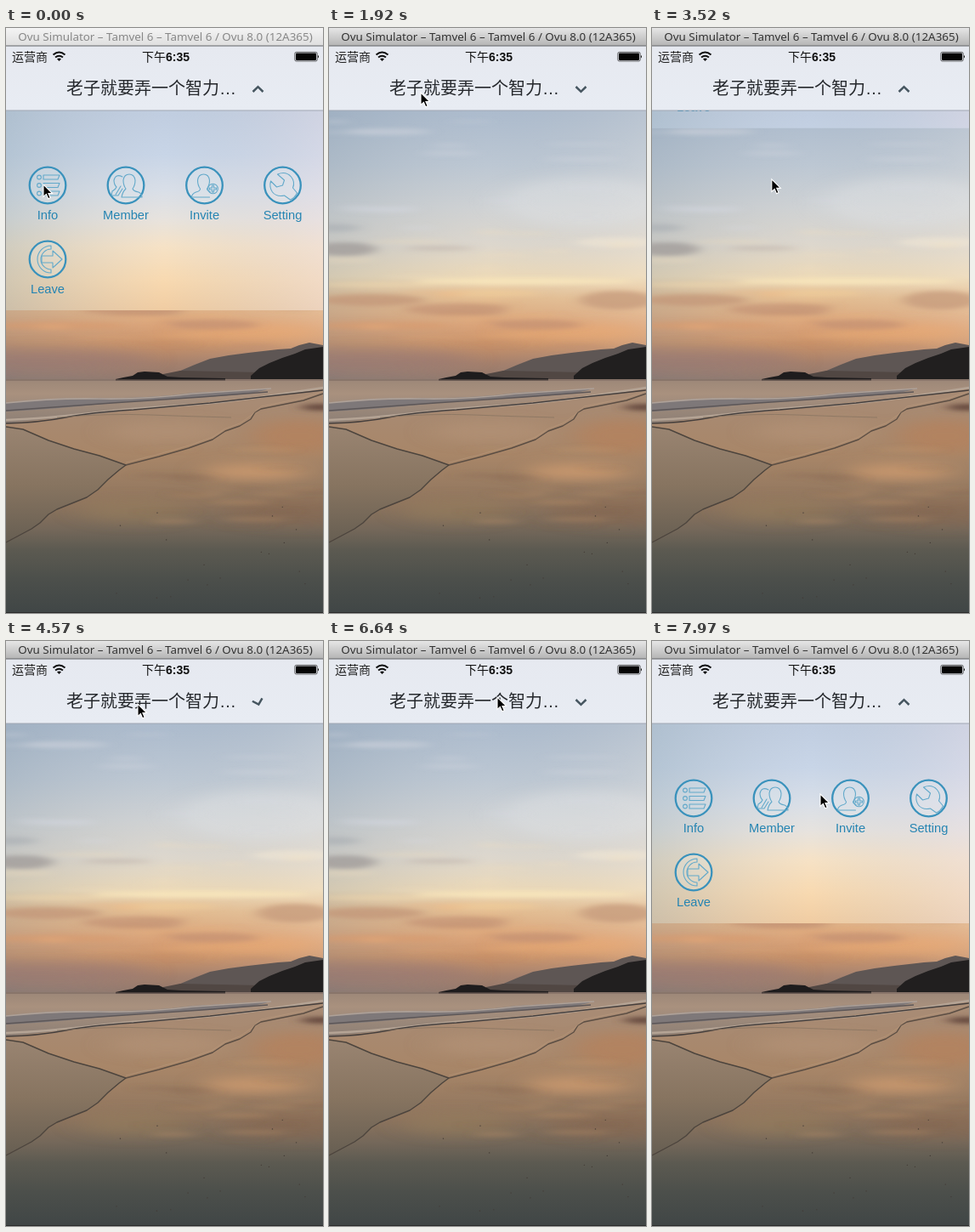
Write an HTML page that moves like this. It is 373 px wide and 688 px high and loops after 8000 ms.

```html
<!DOCTYPE html>
<html lang="zh">
<head>
<meta charset="utf-8">
<title>Navigation menu</title>
<style>
html, body { margin: 0; width: 100%; height: 100%; overflow: hidden; background: #4a4b48; }
svg { display: block; width: 373px; height: 688px; }
.cjk { font-family: "Noto Sans CJK SC", "Noto Sans CJK", sans-serif; }
.label { font: 14.7px "Liberation Sans", sans-serif; fill: #2584b2; text-anchor: middle; }
.glyph { fill: none; stroke: #63a9ca; stroke-width: 1.1; stroke-linejoin: round; stroke-linecap: round; }
</style>
</head>
<body>
<svg viewBox="0 0 373 688" xmlns="http://www.w3.org/2000/svg">
  <defs>
    <linearGradient id="sky" gradientUnits="userSpaceOnUse" x1="0" y1="97" x2="0" y2="413">
      <stop offset="0" stop-color="#acbbcd"/>
      <stop offset=".2" stop-color="#bcc7d3"/>
      <stop offset=".36" stop-color="#cfd2d4"/>
      <stop offset=".5" stop-color="#ddd7cd"/>
      <stop offset=".62" stop-color="#ecd9b8"/>
      <stop offset=".7" stop-color="#e4bd91"/>
      <stop offset=".8" stop-color="#dba479"/>
      <stop offset=".87" stop-color="#c99269"/>
      <stop offset=".94" stop-color="#a5806c"/>
      <stop offset="1" stop-color="#92786c"/>
    </linearGradient>
    <linearGradient id="side">
      <stop offset="0" stop-color="#6f8698" stop-opacity=".2"/>
      <stop offset=".5" stop-color="#a0a8b0" stop-opacity="0"/>
      <stop offset="1" stop-color="#fff4e8" stop-opacity=".16"/>
    </linearGradient>
    <linearGradient id="sea" gradientUnits="userSpaceOnUse" x1="0" y1="413" x2="0" y2="470">
      <stop offset="0" stop-color="#9c8778"/>
      <stop offset=".3" stop-color="#a9917e"/>
      <stop offset="1" stop-color="#887c74"/>
    </linearGradient>
    <linearGradient id="sand" gradientUnits="userSpaceOnUse" x1="0" y1="440" x2="0" y2="688">
      <stop offset="0" stop-color="#a88b74"/>
      <stop offset=".25" stop-color="#a88668"/>
      <stop offset=".48" stop-color="#8f755e"/>
      <stop offset=".6" stop-color="#75685a"/>
      <stop offset=".7" stop-color="#5c5a51"/>
      <stop offset=".84" stop-color="#4c4f4b"/>
      <stop offset="1" stop-color="#404646"/>
    </linearGradient>
    <linearGradient id="film" gradientUnits="userSpaceOnUse" x1="0" y1="470" x2="0" y2="606">
      <stop offset="0" stop-color="#998471"/>
      <stop offset=".5" stop-color="#877460"/>
      <stop offset="1" stop-color="#665e52"/>
    </linearGradient>
    <linearGradient id="frost" gradientUnits="userSpaceOnUse" x1="0" y1="97" x2="0" y2="332">
      <stop offset="0" stop-color="#c0cde0"/>
      <stop offset=".22" stop-color="#c8d5e7"/>
      <stop offset=".4" stop-color="#d9dfe8"/>
      <stop offset=".54" stop-color="#e7e3de"/>
      <stop offset=".68" stop-color="#f6e2c6"/>
      <stop offset=".85" stop-color="#f8d9b0"/>
      <stop offset="1" stop-color="#f0cca2"/>
    </linearGradient>
    <linearGradient id="frostSide">
      <stop offset="0" stop-color="#93a9b4" stop-opacity=".38"/>
      <stop offset=".5" stop-color="#b5bfc8" stop-opacity="0"/>
      <stop offset="1" stop-color="#e8dde6" stop-opacity=".4"/>
    </linearGradient>
    <linearGradient id="bar" x1="0" y1="0" x2="0" y2="1">
      <stop offset="0" stop-color="#e6e9f0"/>
      <stop offset="1" stop-color="#e8ecf3"/>
    </linearGradient>
    <linearGradient id="active" x1="0" y1="0" x2="0" y2="1">
      <stop offset="0" stop-color="#e6e6e6"/>
      <stop offset="1" stop-color="#b4b4b4"/>
    </linearGradient>
    <linearGradient id="idle" x1="0" y1="0" x2="0" y2="1">
      <stop offset="0" stop-color="#f4f4f4"/>
      <stop offset="1" stop-color="#dedede"/>
    </linearGradient>
    <filter id="soft" x="-30%" y="-100%" width="160%" height="300%"><feGaussianBlur stdDeviation="8 2.6"/></filter>
    <filter id="haze" x="-50%" y="-100%" width="200%" height="300%"><feGaussianBlur stdDeviation="16 7"/></filter>
    <clipPath id="body"><rect y="97" width="373" height="591"/></clipPath>
    <clipPath id="sheetClip"><rect id="sheetBox" y="97" width="373" height="235"/></clipPath>
  </defs>

  <g clip-path="url(#body)">
    <rect y="97" width="373" height="317" fill="url(#sky)"/>
    <rect y="97" width="373" height="317" fill="url(#side)"/>
    <g filter="url(#haze)">
      <ellipse cx="300" cy="205" rx="100" ry="30" fill="#e0e2e5" opacity=".45"/>
      <ellipse cx="290" cy="358" rx="85" ry="10" fill="#eeaa72" opacity=".6"/>
      <ellipse cx="40" cy="390" rx="130" ry="13" fill="#977670" opacity=".5"/>
    </g>
    <g id="clouds" filter="url(#soft)"></g>
    <path d="M203 404L222 396L240 389L262 385L285 382L320 378L335 377L345 373L357 370L373 373V413H203Z" fill="#5e5654"/>
    <path d="M185 407L205 403L300 405V413H185Z" fill="#514743"/>
    <path d="M288 409L298 400L310 394L325 388L340 383L352 378L373 375V413H288Z" fill="#211f1f"/>
    <rect y="413" width="373" height="60" fill="url(#sea)"/>
    <path d="M129 413L138 411L149 409L155 405L163 404L180 405L190 410L206 411L258 412V414.500H129Z" fill="#1e1c1d"/>
    <path d="M0 414H373" stroke="#76655d" stroke-width="1.2"/>
    <path d="M0 465Q90 456 150 449T373 424V688H0Z" fill="url(#sand)"/>
    <g filter="url(#haze)">
      <ellipse cx="292" cy="522" rx="62" ry="9" fill="#d9a273" opacity=".7"/>
      <ellipse cx="345" cy="480" rx="55" ry="20" fill="#b98059" opacity=".6"/>
      <ellipse cx="190" cy="475" rx="70" ry="13" fill="#b8957a" opacity=".5"/>
      <ellipse cx="340" cy="570" rx="80" ry="16" fill="#87664e" opacity=".5"/>
      <ellipse cx="150" cy="568" rx="65" ry="14" fill="#98805f" opacity=".5"/>
    </g>
    <g id="glints" filter="url(#soft)"></g>
    <ellipse cx="371" cy="446" rx="24" ry="4" fill="#674b40" filter="url(#soft)"/>
    <path d="M0 441Q50 434 110 435T220 429L310 424Q295 431 230 434T105 443T0 451Z" fill="#7e7879"/>
    <path d="M0 441Q55 435 110 436T220 430L312 424" fill="none" stroke="#aea198" stroke-width="1.6"/>
    <path d="M0 450Q80 444 125 441T230 434L308 428" fill="none" stroke="#5d5758" stroke-width="1.6"/>
    <path d="M0 461Q50 459 100 453T205 444T373 423" fill="none" stroke="#b5a495" stroke-width="2.4"/>
    <path d="M0 465Q40 464 70 458T150 449L240 441L310 433L373 426" fill="none" stroke="#453f3d" stroke-width="1.7"/>
    <path d="M0 469L20 472L50 485L80 495L110 503L141 514L133 520L120 531L108 543L95 552L75 560L60 566L50 572L40 582L30 589L15 597L0 605Z" fill="url(#film)"/>
    <path d="M0 469L20 472L50 485L80 495L110 503L141 514L133 520L120 531L108 543L95 552L75 560L60 566L50 572L40 582L30 589L15 597L0 605" fill="none" stroke="#4c443d" stroke-width="1.4" stroke-linejoin="round"/>
    <path d="M141 514L180 504L215 494L243 484L258 474L275 468L288 460L293 452L300 448L330 442L350 438L373 430" fill="none" stroke="#5a4d43" stroke-width="1.4" stroke-linejoin="round"/>
    <path d="M141 511L180 501L215 491L243 481L258 471L275 465L288 456L300 445L350 435L373 427" fill="none" stroke="#bd9d80" opacity=".5"/>
    <path d="M60 458Q120 453 170 455T265 458" fill="none" stroke="#857260" opacity=".7"/>
    <g id="pebbles" fill="#413a34"></g>
    <path d="M0 687.500H373" stroke="#2b2b2b"/>
  </g>

  <g clip-path="url(#sheetClip)">
    <rect y="97" width="373" height="235" fill="url(#frost)"/>
    <rect y="97" width="373" height="235" fill="url(#frostSide)"/>
    <g id="items"></g>
  </g>

  <rect y="21" width="373" height="76" fill="url(#bar)"/>
  <path d="M0 97H373" stroke="#a2a8b3" stroke-width="1.2"/>
  <text class="cjk" x="7" y="39" font-size="14" fill="#222">运营商</text>
  <g fill="none" stroke="#111" stroke-width="2">
    <path d="M55.500 31.500Q62.500 25.500 69.500 31.500M58 34.500Q62.500 31 67 34.500"/>
    <path d="M60 36.500Q62.500 34.500 65 36.500L62.500 39Z" fill="#111" stroke="none"/>
  </g>
  <text class="cjk" x="160" y="39" font-size="14" font-weight="500" fill="#111">下午<tspan font-family="Liberation Sans, sans-serif" font-weight="700">6:35</tspan></text>
  <rect x="339.800" y="28.400" width="26.400" height="10.600" rx="1.800" fill="none" stroke="#222" stroke-width=".7"/>
  <rect x="341" y="29.500" width="24" height="8.400" rx=".8" fill="#050505"/>
  <path d="M367 32Q369 33.700 367 35.500Z" fill="#050505"/>
  <text class="cjk" x="71" y="78" font-size="20" font-weight="350" fill="#25282c">老子就要弄一个智力<tspan font-family="Liberation Sans, sans-serif">…</tspan></text>
  <path id="chevron" d="M290.500 75L296.500 69.200L302.500 75" fill="none" stroke="#465660" stroke-width="2.500"/>

  <rect id="titleBar" width="373" height="21"/>
  <path d="M0 21H373" stroke="#636569" stroke-width="1.200"/>
  <text id="title" x="187.500" y="15" font-family="Noto Sans, sans-serif" font-size="13.400" text-anchor="middle">Ovu Simulator – Tamvel 6 – Tamvel 6 / Ovu 8.0 (12A365)</text>

  <path id="cursor" d="M0 0V14.500L3.400 11.400L5.700 16.800L8.200 15.700L5.900 10.500H10.500Z" fill="#000" stroke="#fff" stroke-width="1.100"/>
</svg>
<script>
const $ = id => document.getElementById(id);
const LOOP = 8000, STEP = 147.6, TRAVEL = 235, SLIDE = 400;

let seed = 11;
const rand = (a, b) => {
  seed = (seed * 16807) % 2147483647;
  return a + (b - a) * seed / 2147483647;
};
const blob = (x, y, rx, ry, color, o) =>
  `<ellipse cx="${x}" cy="${y}" rx="${rx}" ry="${ry}" fill="${color}" opacity="${o}"/>`;

function drawClouds() {
  let s = blob(18, 260, 38, 8, '#9c9896', .7) + blob(130, 259, 40, 3, '#bdb2a8', .5)
    + blob(8, 235, 28, 5, '#a9adb2', .6) + blob(230, 298, 130, 4, '#fbe9bd', .8)
    + blob(60, 302, 70, 3, '#f3dcb0', .5) + blob(340, 252, 50, 6, '#f1e7d4', .6)
    + blob(50, 320, 62, 7, '#c29578', .7) + blob(150, 331, 60, 7, '#c39375', .7)
    + blob(340, 320, 45, 11, '#c59a7b', .75) + blob(245, 349, 52, 6, '#c08f72', .65)
    + blob(60, 350, 80, 5, '#d99a6d', .5) + blob(190, 312, 60, 4, '#f0cb98', .6)
    + blob(70, 122, 50, 4, '#cbd1da', .6);
  for (let i = 0; i < 40; i++) {
    const y = rand(110, 375);
    const color = y < 240 ? '#d6dae0' : y < 305 ? '#f2dfbd' : i % 2 ? '#eeb17c' : '#b98a70';
    s += blob(rand(0, 373), y, rand(15, 48), rand(1, 3), color, .34);
  }
  $('clouds').innerHTML = s;
}

function drawBeach() {
  let glints = '', pebbles = '';
  for (let i = 0; i < 18; i++) {
    glints += blob(rand(190, 373), rand(495, 590), rand(15, 45), rand(1, 3), i % 2 ? '#c99a70' : '#7d634e', .28);
    pebbles += blob(rand(90, 370), rand(560, 680), .7, .6, '#413a34', 1);
  }
  $('glints').innerHTML = glints;
  $('pebbles').innerHTML = pebbles;
}

// Glyphs are drawn around the centre of each ring.
const person = 'M-4 4Q-7 0-7-6Q-6-13 0-13T7-6Q7 0 4 4';
const infoRow = y => `<circle cx="-10" cy="${y}" r="2.400"/><path d="M-5 ${y - 2.5}H14L12 ${y + 2.5}H-5Z"/>`;
const glyphs = {
  Info: [-9.5, 0, 9.5].map(infoRow).join(''),
  Member: `<path d="${person}Q5 7 11 8Q15 10 15 14H-9Q-8 8-4 4" transform="translate(4 0)"/>
    <path d="M-4-10Q-12-14-14-6Q-14-1-11 2Q-12 5-16 7L-17 12H-9L-4 4"/><path d="M-12 11L-6 1"/>`,
  Invite: `<path d="${person}Q4 6 8 8M-4 4Q-4 7-9 8Q-14 10-14 14H7" transform="translate(-1 0)"/>
    <circle cx="10" cy="4" r="5.800"/><path d="M9 0H11V3H14V5H11V8H9V5H6V3H9Z"/>`,
  Setting: '<path d="M-6-13Q4-17 10-10Q15-4 12 3L17 9Q14 15 9 17L2 12Q-7 14-12 8Q-16 2-14-5L-7 2L0 0L2-6Z"/>',
  Leave: `<path d="M4-16A16 16 0 1 0 4 16V12A12 12 0 1 1 4-12Z"/>
    <path d="M-7-4H6V-10L17 0L6 10V4H-7Z"/>`
};

function drawItems() {
  const xs = [49, 141, 233.5, 325.5];
  $('items').innerHTML = Object.keys(glyphs).map((name, i) =>
    `<g transform="translate(${xs[i % 4]} ${i < 4 ? 185 : 272})">
      <circle r="21.300" fill="#e8f1f5" fill-opacity=".18" stroke="#3a92bc" stroke-width="2.300"/>
      <g class="glyph">${glyphs[name]}</g><text class="label" y="40">${name}</text></g>`).join('');
}

const clamp = x => Math.min(1, Math.max(0, x));

// Standard ease-in-out: cubic-bezier(.42, 0, .58, 1).
function ease(x) {
  let lo = 0, hi = 1;
  for (let i = 0; i < 24; i++) {
    const u = (lo + hi) / 2, v = 1 - u;
    if (3 * v * v * u * .42 + 3 * v * u * u * .58 + u * u * u < x) lo = u; else hi = u;
  }
  return lo * lo * (3 - 2 * lo);
}
const ramp = (t, start, length) => ease(clamp((t - start) / length));

const closes = [573, 3078, 5562], opens = [1992, 4574, 7555];
const openness = (t, openLag, closeLag, length) =>
  1 + opens.reduce((sum, s) => sum + ramp(t, s + openLag, length), 0)
    - closes.reduce((sum, s) => sum + ramp(t, s + closeLag, length), 0);

const path = [
  [0, 44, 184], [590, 44, 184], [880, 52, 183], [1620, 108, 76], [2360, 108, 76],
  [2940, 140, 185], [3240, 140, 185], [4120, 153, 72], [4270, 153, 72], [4420, 155, 74],
  [4570, 155, 74], [5160, 167, 380], [5610, 167, 380], [6640, 198, 66], [7600, 198, 66],
  [7960, 198, 180], [8000, 198, 180]
];
function pointer(t) {
  const i = path.findIndex((p, n) => n && t <= p[0]);
  const a = path[i - 1], b = path[i], k = ramp(t, a[0], b[0] - a[0]);
  return [a[1] + (b[1] - a[1]) * k, a[2] + (b[2] - a[2]) * k];
}

function render(ms) {
  const t = Math.floor((ms % LOOP + 8) / STEP) * STEP;
  const open = openness(t, 0, 0, SLIDE);
  $('sheetBox').setAttribute('height', Math.max(0, TRAVEL * open));
  $('items').setAttribute('transform', `translate(0 ${TRAVEL * (open - 1)})`);
  // The chevron turns just before the sheet opens and once it has closed.
  const turn = 180 * (1 - openness(t, -50, SLIDE, 250));
  $('chevron').setAttribute('transform', `rotate(${turn} 296.5 72)`);
  $('cursor').setAttribute('transform', `translate(${pointer(t)})`);
  const idle = t < 140;
  $('titleBar').setAttribute('fill', idle ? 'url(#idle)' : 'url(#active)');
  $('title').setAttribute('fill', idle ? '#888' : '#333');
}

drawClouds();
drawBeach();
drawItems();
const start = performance.now();
function tick() {
  render(performance.now() - start);
  requestAnimationFrame(tick);
}
tick();
</script>
</body>
</html>
```
